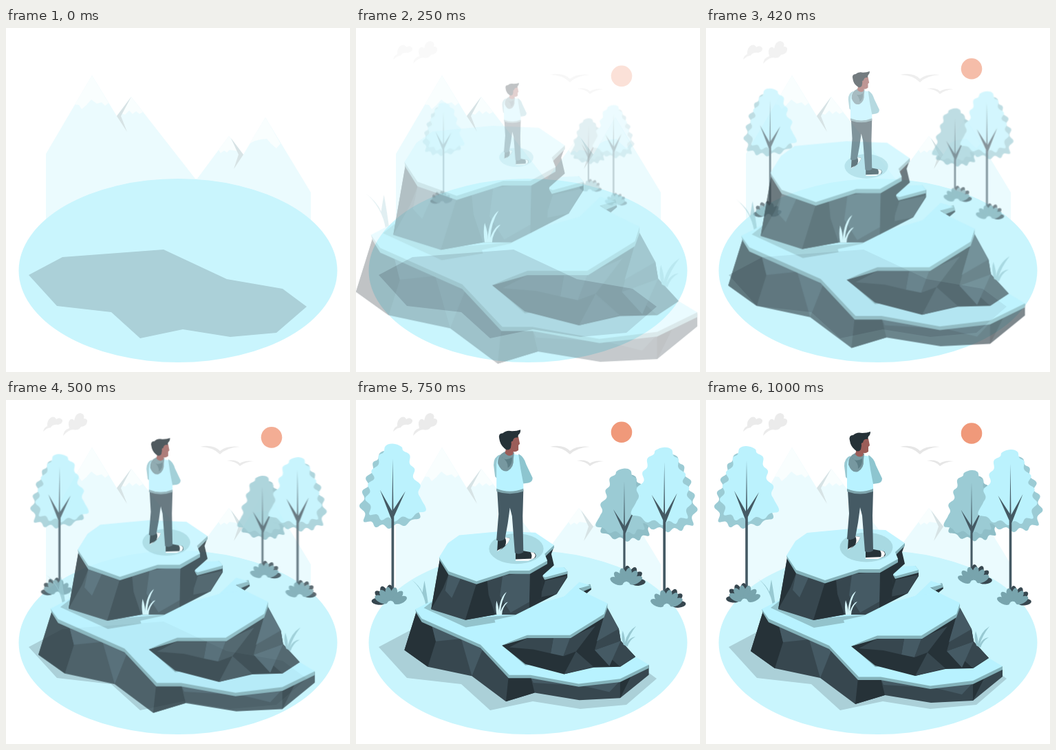
Write an HTML page that moves like this. It is 500 px wide and 500 px high and loops after 1.04 s.

```html
<!DOCTYPE html>
<html lang="en">
<head>
<meta charset="utf-8">
<title>Hiker on a rock</title>
<style>
  html, body { margin: 0; width: 100%; height: 100%; overflow: hidden; background: #fff; }
  svg { display: block; width: 100vw; height: 100vh; }
  .dark { fill: #263238; }
  .mid { fill: #37474f; }
  .pale { fill: #455a64; }
  .top { fill: #b8f2ff; }
  .edge { fill: #84b2ba; }
  .teal { fill: #98c9d2; }
</style>
</head>
<body>
<svg viewBox="0 0 500 500">
  <g id="mountains">
    <path fill="#ebfbfe" d="M58 290V183L125 69L161 128L182 100L275 219H278L324 157L345 184L377 130L443 239V290Z"/>
    <path fill="#f9fefe" d="M125 69L149 109L144 113L139 108L132 110L124 104L117 112L110 118L106 112L100 111Z
      M182 100L199 122L194 125L189 121L184 125L179 120L173 126L167 124Z
      M324 157L338 179L331 178L325 177L321 181L317 178L312 182L309 177Z
      M377 130L399 168L393 175L385 168L379 161L370 162L362 164L354 168Z"/>
    <path fill="#d7e3e5" d="M182 100L161 128L176 151L167 128Z M327 160L345 184L331 205L338 184Z"/>
  </g>
  <ellipse cx="250" cy="352.5" rx="231.5" ry="133.5" fill="#c9f5fd"/>
  <path fill="#abd0d8" d="M33 359L82 333L229 322L321 365L402 379L437 405L393 443L326 449L257 438L195 451L153 413L74 404Z"/>

  <g id="sky">
    <path fill="#ebebeb" d="M54 46Q55 40 60 38Q59 29 66 25Q71 23 73 28Q78 24 82 29Q83 34 76 36Q68 35 65 40Q60 40 54 46Z
      M83 52Q84 43 92 41Q89 31 94 28Q98 27 99 30Q101 19 108 19Q115 20 113 27Q119 27 118 32Q117 38 109 39Q105 45 98 43Q91 43 83 52Z"/>
    <path fill="#e6e6e6" d="M282 68Q301 64 311 74Q321 66 340 68Q321 69 311 79Q300 68 282 68Z
      M321 88Q335 86 340 92Q347 87 360 89Q347 90 340 96Q334 89 321 88Z"/>
  </g>
  <circle id="sun" cx="386" cy="48.5" r="15.3" fill="#f0997a"/>
  <g id="trees"></g>

  <g id="rocks">
    <path class="teal" d="M97 298Q93 274 75 259Q88 269 92 279Q94 266 95 261Q99 283 101 300Z"/>
    <!-- lower slab -->
    <path class="mid" d="M83 307L65 365L100 390L166 404L217 442L260 429L327 440L388 437L431 402V388L320 380L212 350L120 320Z"/>
    <path class="dark" d="M83 307L65 365L100 390L112 352L106 328Z M221 404L254 405L260 429L217 442Z
      M388 411L404 405L388 437Z"/>
    <path class="pale" d="M106 328L150 348L112 352Z M150 348L182 364L166 404Z M254 405L326 418L258 414Z M327 417L388 411L372 428Z"/>
    <path class="edge" d="M81 304L83 310L91 323L179 362L221 407H254L326 420L388 413L431 392V387L300 370L150 310Z"/>
    <path class="top" d="M81 304L106 291L160 300L250 300L303 285L325 276L369 296L364 311L313 342H249L212 358L246 388L400 372L411 375L431 387L388 408L326 415.5L254 402.5H222L179 357L91 318Z"/>
    <path fill="#93c3cc" d="M94 302L108 291L156 318L232 312L224 320L157 331Z"/>
    <!-- middle step -->
    <path class="dark" d="M211 358L249 345H313L364 312L368 300L386 333L389 351L411 375L388 390L348 391L304 401L246 386Z"/>
    <path class="mid" d="M222 361L249 347H288L284 370L258 364Z M313 346L351 329L322 367L303 374Z M322 367L348 390L304 401Z M364 314L386 333L389 351L350 365Z M360 365L389 351L411 375L388 390Z"/>
    <path class="pale" d="M288 347H313L303 374L284 370Z M368 300L386 333L353 352L364 314Z M350 365L389 351L372 389Z"/>
    <path class="edge" d="M211 358L249 341H313L364 310L369 295V302L364 316L314 347H249Z"/>
    <path class="top" d="M232 313L252 302L303 286L325 270L338 280L369 295L364 311L313 342.5H249L211 357L200 320Z"/>
    <!-- small steps -->
    <path class="dark" d="M272 253L309 247V256L293 281L252 302Z M324 271L343 267L345 274L338 280Z"/>
    <path class="mid" d="M276 261L309 254L293 281L268 286Z"/>
    <path class="edge" d="M271 253L304 241L309 247V251L275 260Z M325 271L343 266L345 272L333 277Z"/>
    <path class="top" d="M271 254L282 242L304 241L309 247L276 256Z M304 285L327 263L343 268L325 273L338 280Z"/>
    <!-- upper block -->
    <path class="mid" d="M118 229L105 304L156 320L201 312H232L252 302L270 287L272 253L279 233L200 210Z"/>
    <path class="dark" d="M118 230L131 252L123 272L105 304Z M173 265L189 261L191 282L201 312L156 320Z M253 249L279 234L272 254L270 287L252 302Z M276 224L289 210L285 221L289 238L271 254Z"/>
    <path class="pale" d="M131 252L149 258L136 287L126 276Z M212 254L253 248L252 293L224 309L208 284Z"/>
    <path class="edge" d="M117 226L118 231L131 252L173 266.5L222 251H253L279 236V231L276 225L289 212V208Z"/>
    <path fill="#c1f4ff" d="M117 226L130 205L147 193L211 187L261 189L289 208L275 221L279 231L252 246H223L173 262L131 247Z"/>
    <!-- grass -->
    <path fill="#d5f5fa" d="M203 312Q201 300 203 291Q207 302 206 309Q208 285 218 278Q210 291 209 307Q214 294 220 293Q211 302 211 312Z"/>
    <path class="teal" d="M393 357Q389 345 392 336Q396 348 395 354Q399 337 412 329Q402 342 398 355Q402 346 411 345Q402 350 399 360Z"/>
  </g>

  <g id="person">
    <ellipse cx="233" cy="214" rx="38.5" ry="21.5" fill="#a8d9e2"/>
    <path class="dark" d="M207 201L217 198L224 199Q223 206 213 214L206 217Z M232 219L243 217L259 220Q263 225 258 228Q247 231 232 230Z"/>
    <path fill="#fff" d="M217 198L224 199Q223 205 217 210Q220 204 217 198Z M253 219Q260 219 260 224L258 228H254Q256 223 253 219Z M207 216L215 212L206 218Z M232 229L257 228L250 231H232Z"/>
    <path class="pale" d="M206 131H243L242 168L243 219Q237 223 231 220L227 168L224 156L221 178L217 200Q211 205 205 202L208 165Z"/>
    <path class="teal" d="M210 81Q201 84 201 96L203 112L208 117L209 96Z"/>
    <path class="top" d="M210 82Q204 88 205 100V130Q224 138 243 130V112L238 82L227 80Z"/>
    <path fill="#7ea4ac" d="M205 129Q224 137 243 129V133Q224 140 205 133Z"/>
    <path fill="#8dc5cf" d="M236 80Q244 84 247 95L256 114Q256 120 250 121L243 122L239 101Z"/>
    <path fill="#7798a0" d="M217 77Q206 82 207 94Q212 107 221 104Q230 99 229 87L230 78Z"/>
    <path fill="#5d7e86" d="M212 84Q218 91 227 85Q228 95 221 100Q222 91 212 84Z"/>
    <path fill="#9b5d59" d="M222 61Q230 52 236 56L238 66L236 68V75Q232 78 229 77L228 81Q222 85 217 79L219 70Z"/>
    <path class="dark" d="M209 59Q207 51 214 51Q219 46 227 48Q234 48 239 46Q239 51 236 53L235 57Q229 56 228 62Q225 62 226 66L225 72Q221 77 216 72Q210 67 209 59Z"/>
  </g>
</svg>

<script>
const LOOP = 1040, STEP = 1000 / 24, LEAD = 33, DURATION = 1000;
const part = id => document.getElementById(id);

// Smooth closed curve through the given points.
function smooth(points) {
  const at = i => points[(i + points.length) % points.length];
  const control = (i, sign) => at(i).map((v, k) => v + sign * (at(i + 1)[k] - at(i - 1)[k]) / 5);
  return `M${at(0)}` + points.map((_, i) =>
    `C${control(i, 1)} ${control(i + 1, -1)} ${at(i + 1)}`).join('') + 'Z';
}

const crown = smooth([[0, 0], [12, 4], [15, 10], [24, 16], [24, 28], [31, 36], [29, 48], [39, 58],
  [36, 69], [40, 78], [47, 94], [34, 98], [25, 106], [14, 103], [3, 110], [-6, 104], [-16, 108],
  [-22, 100], [-33, 100], [-31, 88], [-39, 78], [-32, 68], [-35, 57], [-26, 49], [-30, 38],
  [-20, 29], [-20, 17], [-13, 12], [-10, 3]]);

const tree = (x, y, size, flip, front, back, foot) => `
  <g transform="translate(${x} ${y}) scale(${flip * size} ${size})">
    <path d="${crown}" fill="${back}" transform="translate(-8 10)"/>
    <path d="${crown}" fill="${front}"/>
    <path class="pale" d="M0 21L1 93L18 67L1.8 103V${foot}H-1.8V107L-18 65L-1 95Z"/>
  </g>`;

const leaves = (x, y, angles, length, color) => angles.map(a =>
  `<ellipse cx="${x}" cy="${y - length * 0.6}" rx="4.8" ry="${length * 0.4}" fill="${color}" transform="rotate(${a} ${x} ${y})"/>`
).join('');

const bush = (x, y, flip) => `
  <g transform="translate(${x} ${y}) scale(${flip} 1)">
    ${leaves(-2, -4, [-85, -52, -26, 2], 25, '#37474f')}
    ${leaves(0, -1, [-62, -36, -10, 16, 42, 66], 25, '#78a4ad')}
  </g>`;

part('trees').innerHTML =
  tree(59, 67, 1, 1, '#bbf2fd', '#9bcbd4', 213) + bush(56, 295, 1) +
  tree(386, 102, 0.86, -1, '#9bcbd4', '#8fbec7', 173) + bush(389, 268, -1) +
  tree(442.5, 72, 1, -1, '#bbf2fd', '#9bcbd4', 213) + bush(446, 299, -1);

const bezier = (s, a, b) => 3 * (1 - s) ** 2 * s * a + 3 * (1 - s) * s * s * b + s ** 3;

// Timing curve with a slight overshoot before it settles.
function ease(x) {
  let low = 0, high = 1;
  for (let i = 0; i < 30; i++) {
    const s = (low + high) / 2;
    if (bezier(s, 0.36, 0.5) < x) low = s; else high = s;
  }
  return bezier(low, -0.01, 1.38);
}

function place(id, alpha, transform) {
  part(id).setAttribute('opacity', alpha);
  if (transform) part(id).setAttribute('transform', transform);
}

const zoom = (x, y, k) => `translate(${x} ${y}) scale(${k}) translate(${-x} ${-y})`;

function draw(time) {
  const tick = Math.floor((time % LOOP + 5) / STEP);
  const p = tick < 2 ? 0 : ease(Math.min(1, (tick * STEP + LEAD) / DURATION));
  const alpha = Math.max(0, Math.min(1, p));
  place('sky', alpha);
  place('sun', alpha, `translate(0 ${30 * (1 - p)})`);
  place('trees', alpha, zoom(250.5, 184, 0.5 + p / 2));
  place('rocks', alpha, zoom(248, 313, 1.5 - p / 2));
  place('person', alpha, zoom(233, 141, 0.5 + p / 2));
}

const start = performance.now();
function frame() {
  draw(performance.now() - start);
  requestAnimationFrame(frame);
}
frame();
</script>
</body>
</html>
```
